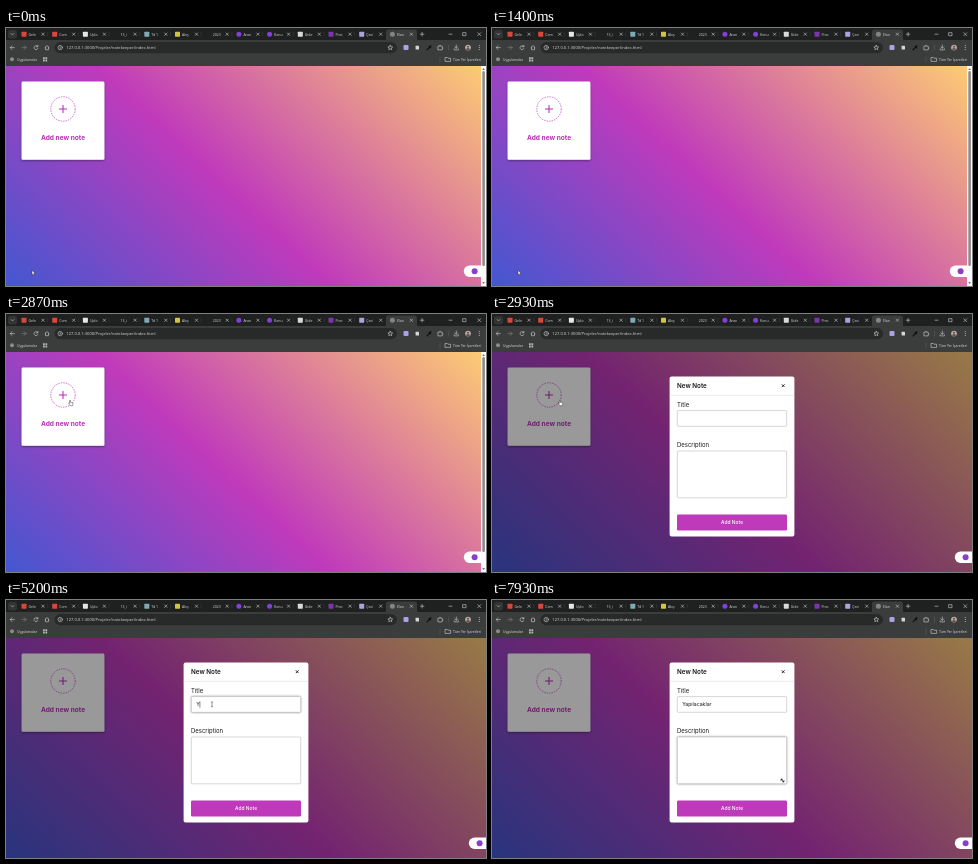
Animation, 480 px wide and 258 px high, one loop 8000 ms. Source, as an HTML page:

```html
<!DOCTYPE html>
<html lang="tr">
<head>
<meta charset="utf-8">
<title>Note keeper</title>
<style>
  html, body { margin: 0; width: 100%; height: 100%; overflow: hidden; background: #202121; }
  svg { display: block; width: 100vw; height: 100vh; }
  text { white-space: pre; }
  .ui { font: 3.5px "Open Sans", "Noto Sans", sans-serif; fill: #d8d9da; }
  .page { font-family: Inter, "Open Sans", sans-serif; fill: #181818; }
  .line { fill: none; stroke: #cfd1d2; stroke-width: .6; stroke-linecap: round; stroke-linejoin: round; }
  .field { fill: #fff; stroke: #b5b5b5; stroke-width: .55; }
  .focus { filter: drop-shadow(0 .8px .9px rgba(0, 0, 0, .4)); }
</style>
</head>
<body>
<svg viewBox="0 0 480 258" preserveAspectRatio="none">
  <defs>
    <linearGradient id="grad" gradientUnits="userSpaceOnUse">
      <stop offset="0" stop-color="#4357d0"/>
      <stop offset=".46" stop-color="#c03abb"/>
      <stop offset="1" stop-color="#fdcb74"/>
    </linearGradient>
    <filter id="soft" x="-20%" y="-20%" width="140%" height="140%">
      <feDropShadow dx="0" dy="1" stdDeviation="1.3" flood-opacity=".4"/>
    </filter>
  </defs>

  <!-- Page -->
  <rect y="38" width="480" height="220" fill="url(#grad)"/>
  <rect x="15.6" y="53.6" width="82.8" height="78.2" rx="1.4" fill="#fff" filter="url(#soft)"/>
  <g fill="none" stroke="#b92fb5">
    <circle cx="57" cy="81" r="12.2" stroke-width=".65" stroke-dasharray="1.5 1"/>
    <path d="M53 81h8M57 77v8" stroke-width="1.05"/>
  </g>
  <text class="page" x="57" y="112.3" font-size="6.6" font-weight="700" text-anchor="middle" style="fill:#b92fb5">Add new note</text>

  <g id="scroll">
    <rect x="475" y="38" width="5" height="220" fill="#fafafa"/>
    <rect x="476.3" y="43" width="2.6" height="195" rx="1.3" fill="#8b8b8b"/>
    <path d="M476.2 42l1.4-1.9 1.4 1.9zM476.2 254l1.4 1.9 1.4-1.9z" fill="#777"/>
  </g>

  <!-- Dialog -->
  <g id="modal">
    <rect y="38" width="480" height="220" fill="#000" opacity=".4"/>
    <rect x="177.6" y="62.6" width="124.8" height="159.8" rx="2" fill="#fff"/>
    <path d="M177.6 81.4h124.8" stroke="#d4d4d4" stroke-width=".5"/>
    <path d="M289.8 70.3l2.8 2.8m0-2.8l-2.8 2.8" stroke="#181818" stroke-width=".9"/>
    <rect id="titleBox" class="field" x="185.3" y="96.6" width="109.4" height="15.7" rx="1"/>
    <rect id="descBox" class="field" x="185.3" y="137" width="109.4" height="46.8" rx="1"/>
    <rect x="185" y="200.6" width="110" height="15.8" rx="1.2" fill="#bf3abb"/>
    <g class="page" font-size="5.95">
      <text x="185" y="74" font-size="6.3" font-weight="600">New Note</text>
      <text x="185" y="92.7">Title</text>
      <text x="185" y="133">Description</text>
      <text x="240" y="210.3" font-size="4.95" font-weight="500" text-anchor="middle" style="fill:#fff">Add Note</text>
      <text id="typed" x="190.2" y="106.4" font-size="5.15"></text>
    </g>
    <rect id="caret" y="101.4" width=".5" height="6.3" fill="#111"/>
  </g>

  <g id="badge">
    <path d="M480 237.5h-11.5a5.7 5.7 0 0 0 0 11.4H480z" fill="#fff"/>
    <circle cx="473.6" cy="243.2" r="3" fill="#8b3fc6"/>
  </g>

  <!-- Browser frame -->
  <rect width="480" height="13" fill="#1f2020"/>
  <rect y="12" width="480" height="26" fill="#3b3c3c"/>
  <path d="M378 12.5q2 0 2-2V4q0-2.500 2.500-2.500h26q2.500 0 2.500 2.500v6.500q0 2 2 2z" fill="#3b3c3c"/>
  <rect x="2" y="2" width="9" height="8.500" rx="2.200" fill="#333535"/>
  <rect x="48.500" y="14" width="342.500" height="11.200" rx="5.600" fill="#282929"/>
  <g id="tabs" class="ui" font-size="3.5"></g>
  <g class="line">
    <path d="M5.2 5.600l1.300 1.300 1.300-1.300M414.300 6.200h3.600m-1.800-1.800v3.600"/>
    <path d="M443 6.200h3M457 4.700h3v3h-3zM471.800 4.700l3 3m0-3l-3 3"/>
    <path d="M8.300 19.600H4.200m1.900-1.900l-1.900 1.900 1.900 1.900"/>
    <path d="M16 19.600h4.100m-1.900-1.900l1.900 1.900-1.900 1.900" stroke="#858686"/>
    <path d="M31.500 18.300a2 2 0 1 0 .4 2.100M31.900 17.300v1.500h-1.500"/>
    <path d="M39 19.500l2-1.900 2 1.900M39.500 19.200v2.500h3v-2.500"/>
    <circle cx="54.200" cy="19.600" r="2.200"/>
    <path d="M54.200 19.400v1.200m0-2.100v.05"/>
    <path d="M384.300 17.300l.7 1.500 1.700.2-1.300 1.100.4 1.600-1.500-.8-1.500.8.400-1.600-1.300-1.100 1.700-.2z"/>
    <path d="M432.300 18.200h1.300v-.7h1v.7h1.600v1.400h.6v1h-.6v1.300h-3.900z"/>
    <path d="M442.600 17v5" stroke="#5d5f5f"/>
    <path d="M450.300 17v3.200m-1.400-1.300l1.400 1.400 1.400-1.400M448.200 20.800v1.100h4.200v-1.100"/>
    <path d="M434 29v5" stroke="#5d5f5f"/>
    <path d="M439.400 29.500h1.900l.6.7h2.700v3.200h-5.200z"/>
  </g>
  <rect x="397.500" y="17" width="5" height="5" rx="1" fill="#a9a3e4"/>
  <rect x="409.600" y="17.700" width="3.400" height="3.800" rx=".6" fill="#d5d6d6"/>
  <path d="M421 21.800l2.500-2.500m-.4-1l1.500 1.500m-.5-1.200l.9-.9" stroke="#0c0c0c" stroke-width="1.100" stroke-linecap="round"/>
  <circle cx="462" cy="19.600" r="2.900" fill="#b9aaa5"/>
  <circle cx="462" cy="18.800" r="1" fill="#65504c"/>
  <path d="M460 21.500a2 1.500 0 0 1 4 0q-2 1.500-4 0" fill="#65504c"/>
  <path d="M473.300 17.500v.05m0 1.950v.05m0 1.950v.05" class="line" style="stroke-width:.9"/>
  <circle cx="6" cy="31.300" r="2" fill="#8e8b88"/>
  <path d="M37 29.200h1.800v1.800H37zm2.400 0h1.800v1.800h-1.800zM37 31.600h1.800v1.800H37zm2.400 0h1.800v1.800h-1.800z" fill="#b3b5b5"/>
  <g class="ui">
    <text x="60.300" y="21" style="font-size:4.100px">127.0.0.1:3000/Projeler/notekeeper/index.html</text>
    <text x="11" y="32.600" style="font-size:3.400px">Uygulamalar</text>
    <text x="447" y="32.600" style="font-size:3.450px">Tüm Yer İşaretleri</text>
  </g>

  <g id="cursor">
    <path id="arrow" d="M0 0v4.200l1-.9.700 1.500.8-.4-.7-1.400h1.300z" fill="#fff" stroke="#111" stroke-width=".35"/>
    <path id="hand" d="M-.5 0q.5-.6 1 0v1.800l2 .5q.6.200.5.900l-.5 2H.1L-1.500 3q.1-.7 1 0z" fill="#fff" stroke="#111" stroke-width=".4"/>
    <path id="beam" d="M-.8-2.400h1.600M0-2.400v4.800M-.8 2.400H.8" fill="none" stroke="#222" stroke-width=".5"/>
    <path id="resize" d="M-1.500-1.500h1.500l-1.500 1.500zM1.500 1.500H0L1.500 0zM-1-1l2 2" fill="#222" stroke="#222" stroke-width=".6"/>
  </g>
</svg>

<script>
const $ = id => document.getElementById(id);
const LOOP = 8000, OPEN = 2900, FOCUS = 3800, BLUR = 7720;
const WORD = 'Yapılacaklar';
const TABS = [
  ['Gele', '#d8473c'], ['Com', '#d8473c'], ['Uplo', '#e6e6e6'], ['13_i'],
  ['Td 1', '#7fa9b5'], ['Akış', '#d3c33f'], ['2023'], ['Aran', '#8240d8', 1],
  ['Konu', '#8240d8', 1], ['Gide', '#d9d9d9'], ['Proc', '#7a35a8'],
  ['Çevi', '#a9a3e4'], ['Elan', '#828484', 1]
];
// time, x, y of the pointer
const PATH = [
  [0, 26, 242.500], [1560, 26, 242.500], [1730, 56, 154], [2150, 62, 100], [2500, 64, 86.500],
  [2870, 64, 86.500], [2930, 67.800, 86.500], [3100, 67.800, 86.500], [3620, 206, 104.300],
  [7050, 206, 104.300], [7400, 299, 187.500], [7500, 299, 187.500], [7700, 290.500, 180.500]
];
const keyTime = i => i < 4 ? [5050, 5800, 6200, 6350][i] : 6440 + (i - 4) * 62;

$('tabs').innerHTML = TABS.map(([name, color, round], i) => {
  const x = 37 + 30.700 * i;
  const icon = color ? `<rect x="${x - 21.500}" y="3.700" width="5" height="5" rx="${round ? 2.500 : .6}" fill="${color}"/>` : '';
  const edge = i < 11 ? `<path d="M${x + 4.700} 4v4.500" stroke="#4a4c4c" stroke-width=".4"/>` : '';
  return `${icon}${edge}<text x="${x - 14.500}" y="7.500">${name}</text>` +
    `<path class="line" d="M${x - 1.200} 5l2.400 2.400m0-2.400l-2.400 2.400"/>`;
}).join('');

const show = (id, on) => $(id).setAttribute('display', on ? 'inline' : 'none');
const ease = p => p * p * (3 - 2 * p);

function pointer(t) {
  const i = PATH.findIndex(k => k[0] > t);
  if (i < 0) return PATH[PATH.length - 1].slice(1);
  const [t0, x0, y0] = PATH[i - 1], [t1, x1, y1] = PATH[i];
  const p = ease((t - t0) / (t1 - t0));
  return [x0 + (x1 - x0) * p, y0 + (y1 - y0) * p];
}

function pointerKind(t, x, y) {
  const inside = (l, top, r, b) => x > l && x < r && y > top && y < b;
  if (t < OPEN + 90) return inside(15, 53, 99, 132) ? 'hand' : 'arrow';
  if (inside(289, 179, 295, 184)) return 'resize';
  if (inside(185, 96, 295, 112.500) || inside(185, 137, 295, 184)) return 'beam';
  return 'arrow';
}

// A 43 degree gradient across the page box
function setGradient(w) {
  const a = 43 * Math.PI / 180, s = Math.sin(a), c = Math.cos(a);
  const half = (w * s + 220 * c) / 2;
  const ends = { x1: w / 2 - half * s, y1: 148 + half * c, x2: w / 2 + half * s, y2: 148 - half * c };
  for (const k in ends) $('grad').setAttribute(k, ends[k]);
}

function draw(t) {
  const open = t >= OPEN;
  show('modal', open);
  show('scroll', !open);
  setGradient(open ? 480 : 475);
  $('badge').setAttribute('transform', `translate(${open ? 0 : -5} 0)`);

  let n = 0;
  while (n < WORD.length && keyTime(n) <= t) n++;
  const text = $('typed');
  text.textContent = WORD.slice(0, n);

  const active = t >= FOCUS && t < BLUR;
  const since = t - (n ? keyTime(n - 1) : FOCUS);
  show('caret', active && since % 1000 < 500);
  $('caret').setAttribute('x', 190.200 + (n && open ? text.getComputedTextLength() : 0));
  $('titleBox').classList.toggle('focus', active);
  $('descBox').classList.toggle('focus', t >= BLUR);

  const [x, y] = pointer(t), kind = pointerKind(t, x, y);
  $('cursor').setAttribute('transform', `translate(${x} ${y})`);
  for (const k of ['arrow', 'hand', 'beam', 'resize']) show(k, k === kind);
}

const start = performance.now();
function tick() {
  draw((performance.now() - start) % LOOP);
  requestAnimationFrame(tick);
}
tick();
</script>
</body>
</html>
```
